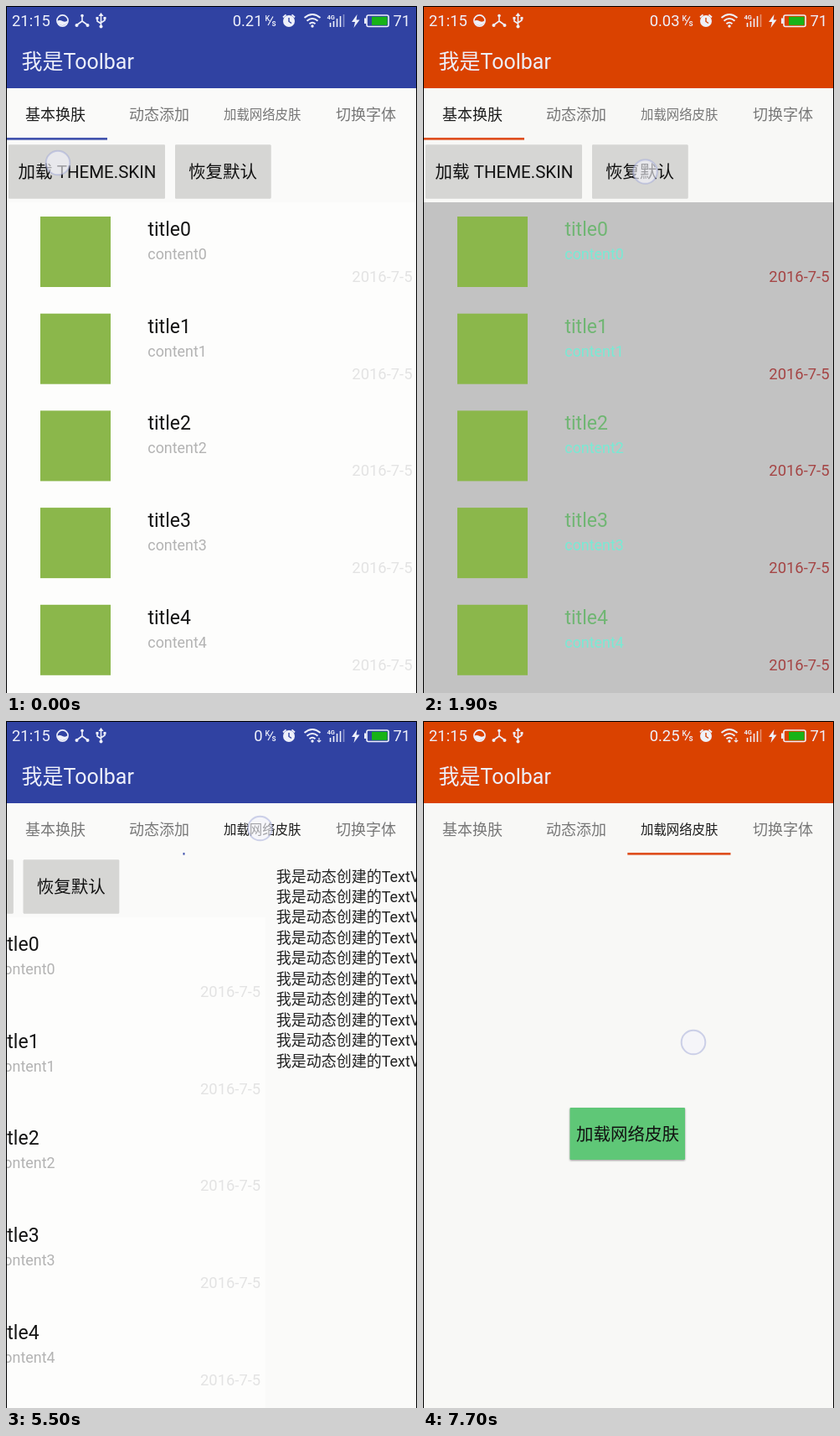
Animation of 491 by 819 pixels, one loop 8000 ms. Source, as an HTML page:

```html
<!DOCTYPE html>
<html lang="zh">
<head>
<meta charset="utf-8">
<title>Skin switch</title>
<style>
  html, body { margin: 0; width: 100%; height: 100%; overflow: hidden; background: #000; }
  svg { display: block; width: 100vw; height: 100vh; }
  text { font-family: Roboto, "Noto Sans CJK SC", "Noto Sans CJK", sans-serif; white-space: pre; }
  #app {
    --bar: #3042a2; --line: #4354ae; --page: #fafaf9; --list: #fdfdfc;
    --title: #141414; --content: #b3b3b3; --date: #e3e3e3; --net: #fafaf9;
  }
  #app.warm {
    --bar: #da4200; --line: #df5020; --page: #f8f8f6; --list: #c2c2c2;
    --title: #70b673; --content: #78ead4; --date: #a54545; --net: #5fc777;
  }
  .bar { fill: var(--bar); }
  .line { fill: var(--line); }
  .page { fill: var(--page); }
  .list { fill: var(--list); }
  .status { font-size: 18.4px; fill: #eef0fa; }
  .tab { fill: #777; }
  .tab.on { fill: #1c1c1c; }
  .title { font-size: 23px; fill: var(--title); }
  .content { font-size: 17.9px; fill: var(--content); }
  .date { font-size: 18.4px; fill: var(--date); text-anchor: end; }
  .label { font-size: 20.5px; fill: #111; }
  .made { font-size: 18px; fill: #222; }
  .btn { fill: #d6d6d4; filter: drop-shadow(0 .5px .6px rgba(0,0,0,.14)); }
  .btn.net { fill: var(--net); filter: drop-shadow(0 1px 1.2px rgba(0,0,0,.4)); }
  .btn.up { filter: drop-shadow(0 2px 2px rgba(0,0,0,.4)); }
  .card { fill: #fafafa; filter: drop-shadow(0 4px 8px rgba(0,0,0,.4)); }
  .icons { fill: none; stroke: #eef0fa; stroke-width: 1.6; }
  .icons .solid { fill: #eef0fa; stroke: none; }
</style>
</head>
<body>
<svg id="app" viewBox="0 0 491 819" preserveAspectRatio="none">
  <defs>
    <clipPath id="btnClip"><rect x="3" y="165" width="187" height="65"/></clipPath>
  </defs>
  <rect class="page" width="491" height="819"/>

  <g id="pager">
    <g id="basic">
      <rect class="list" y="234" width="491" height="585"/>
      <rect id="load" class="btn" x="3" y="165.5" width="187" height="64" rx="1"/>
      <circle id="ripple" clip-path="url(#btnClip)" fill="#000"/>
      <rect class="btn" x="202" y="165.5" width="114.5" height="64" rx="1"/>
      <text class="label" x="14.6" y="205">加载 THEME.SKIN</text>
      <text class="label" x="218" y="205">恢复默认</text>
    </g>
    <g id="dynamic" transform="translate(491)"></g>
    <g transform="translate(982)">
      <rect class="btn net" x="175.5" y="461" width="137.5" height="62" rx="1"/>
      <text class="label" x="183" y="499.5">加载网络皮肤</text>
    </g>
  </g>

  <rect class="page" y="97" width="491" height="64"/>
  <g id="tabs"></g>
  <rect id="marker" class="line" y="157" height="2.7"/>

  <rect class="bar" width="491" height="98"/>
  <text x="18.5" y="75" font-size="25" fill="#eef0fa">我是Toolbar</text>

  <text class="status" x="7" y="24">21:15</text>
  <text id="speed" class="status" x="306.5" y="24" text-anchor="end"></text>
  <text class="status" x="462.5" y="24">71</text>
  <g class="icons">
    <circle cx="67.5" cy="17.5" r="6.6"/>
    <path class="solid" d="M61 18q3-2 6.5 0t6.5-1a6.6 6.6 0 0 1-13 1z"/>
    <path d="M91 10V18L84 23M91 18L98 23"/>
    <circle class="solid" cx="91" cy="11.5" r="1.8"/>
    <circle class="solid" cx="84.5" cy="23" r="2"/>
    <circle class="solid" cx="97.5" cy="23" r="2"/>
    <path d="M113.5 11V25M109 14V18L113.5 21M118 14V17L113.5 20"/>
    <path class="solid" d="M113.5 8l3 4h-6zM107.5 13h3v3h-3zM116.5 13h3v3h-3z"/>
    <circle class="solid" cx="113.5" cy="24.5" r="2"/>

    <text class="solid" x="309.5" y="17.5" font-size="9" font-weight="500">K</text>
    <text class="solid" x="317.5" y="24" font-size="10" font-weight="500">s</text>
    <path d="M313 23L319 12.5" stroke-width="1.2"/>

    <circle cx="338" cy="18" r="6" fill="#eef0fa" stroke-width="2"/>
    <path d="M331 13.5l3.5-3.2M345 13.5l-3.5-3.2" stroke-width="1.8"/>
    <path d="M338 14V18.500L341 20.5" style="stroke:var(--bar)" stroke-width="1.4"/>
    <path d="M356.5 14q9.500-8 19 0M359.500 17.700q6.500-5.500 13 0M362.500 21.200q3.500-3 7 0" stroke-width="2"/>
    <circle class="solid" cx="366" cy="24" r="1.7"/>
    <path id="traffic" d="M374 20V25M371.800 23l2.200 2 2.200-2" stroke-width="1.100"/>
    <text class="solid" x="383.5" y="16" font-size="7.5" font-weight="700">4G</text>
    <path d="M387.5 25V20M391.5 25V18M395.500 25V15M399.500 25V12"/>
    <path d="M403.5 25V10" opacity=".45"/>
    <path class="solid" d="M419.5 10l-6.500 9h4l-1.500 7 7-9.500h-4z"/>
    <rect x="431" y="11" width="26" height="13.5" rx="2"/>
    <path class="solid" d="M428 14.5h2.500v6.500H428z"/>
    <rect x="437" y="12.8" width="18.5" height="10" style="fill:#17b317;stroke:none"/>
  </g>

  <rect id="dim" width="491" height="819"/>
  <g id="dialog">
    <rect class="card" x="31" y="314" width="427.5" height="230" rx="3"/>
    <text x="61.5" y="372" font-size="25.5" fill="#222">换肤中</text>
    <text x="61.5" y="432" font-size="20.5" fill="#6a6a6a">请耐心等待</text>
    <rect x="62" y="472" width="365" height="3.5" fill="#f4bccb"/>
    <text x="61.5" y="506.5" font-size="20.4" fill="#666">0%</text>
    <text x="427.5" y="506.5" font-size="20.4" fill="#666" text-anchor="end">0/100</text>
  </g>

  <circle id="touch" r="14.3" fill="rgba(244,244,250,.62)" stroke="rgba(160,168,215,.5)" stroke-width="2"/>
  <path d="M.5 819V.5H490.5V819" fill="none" stroke="#000"/>
</svg>

<script>
const LOOP = 8000, STEP = 100;
const $ = id => document.getElementById(id);

function add(parent, tag, attrs, text) {
  const el = document.createElementNS('http://www.w3.org/2000/svg', tag);
  for (const key in attrs) el.setAttribute(key, attrs[key]);
  if (text) el.textContent = text;
  parent.appendChild(el);
  return el;
}
const set = (id, attrs) => {
  for (const key in attrs) $(id).setAttribute(key, attrs[key]);
};

for (let i = 0; i < 5; i++) {
  const row = add($('basic'), 'g', { transform: `translate(0 ${i * 115.7})` });
  add(row, 'rect', { x: 41, y: 251, width: 84, height: 84, fill: '#8bb74b' });
  add(row, 'text', { class: 'title', x: 169.5, y: 274 }, 'title' + i);
  add(row, 'text', { class: 'content', x: 169.3, y: 302 }, 'content' + i);
  add(row, 'text', { class: 'date', x: 485.5, y: 329 }, '2016-7-5');
}
for (let i = 0; i < 10; i++)
  add($('dynamic'), 'text', { class: 'made', x: 13, y: 191.5 + i * 24.45 }, '我是动态创建的TextView');

const tabs = [['基本换肤', 23, 18], ['动态添加', 147, 18], ['加载网络皮肤', 260, 15.4], ['切换字体', 394, 18]]
  .map(([name, x, size]) => add($('tabs'), 'text', { x, y: size > 16 ? 135.5 : 134.5, 'font-size': size }, name));

const clamp = v => Math.min(1, Math.max(0, v));
const mix = (a, b, p) => a + (b - a) * p;
const decelerate = p => 1 - (1 - p) ** 5;

// cubic-bezier(.4, 0, .2, 1)
function standard(x) {
  let lo = 0, hi = 1, s = .5;
  for (let i = 0; i < 24; i++) {
    s = (lo + hi) / 2;
    const bx = 1.2 * s * (1 - s) ** 2 + .6 * s * s * (1 - s) + s ** 3;
    if (bx < x) lo = s; else hi = s;
  }
  return x <= 0 ? 0 : x >= 1 ? 1 : s * s * (3 - 2 * s);
}

// from, to, x, y, opacity
const touches = [
  [0, 1400, 62, 187, 1],
  [1900, 3800, 265.5, 197.5, 1],
  [3800, 3900, 265.5, 197.5, .5],
  [4500, 5600, 303.5, 128, 1],
  [6800, 6900, 239, 517, 1],
  [7700, 8000, 323, 383, 1]
];
// time: [dialog opacity, dim opacity]
const dialogs = {
  1400: [.3, .03], 1500: [.77, .08], 1600: [1, .3], 1700: [.6, .25], 1800: [0, .1],
  6900: [.77, .08], 7000: [1, .3], 7100: [.4, .2]
};
// time: [x, radius, opacity]
const ripples = { 1400: [66, 22, .06], 1500: [80, 50, .07], 1600: [92, 85, .05], 1700: [96, 105, .02] };
const speeds = [[7000, '0.25'], [4100, '0'], [1900, '0.03'], [0, '0.21']];
const SLIDE = 5476;

function draw(now) {
  const t = Math.floor(now % LOOP / STEP) * STEP;
  $('app').classList.toggle('warm', t >= 1500 && t < 3700 || t >= 7000);
  $('speed').textContent = speeds.find(s => t >= s[0])[1];
  set('traffic', { opacity: t >= 4100 ? 1 : 0 });

  const slid = t >= SLIDE;
  const scroll = 982 * decelerate(clamp((t - SLIDE) / 600));
  const grow = standard(clamp((t - SLIDE) / 300));
  const left = slid ? mix(211, 244.3, grow) : 1;
  const right = slid ? mix(211, 367.5, grow) : 121;
  set('pager', { transform: `translate(${-scroll})` });
  set('marker', { x: left, width: right - left });
  tabs.forEach((tab, i) => tab.setAttribute('class', i === (slid ? 2 : 0) ? 'tab on' : 'tab'));

  const [alpha, dim] = dialogs[t] || [0, 0];
  set('dialog', { opacity: alpha });
  set('dim', { opacity: dim });

  const [rx, r, ra] = ripples[t] || [0, 0, 0];
  set('ripple', { cx: rx, cy: 197, r, opacity: ra });
  $('load').classList.toggle('up', ra > 0);

  const [, , x, y, opacity] = touches.find(p => t >= p[0] && t < p[1]) || [0, 0, 0, 0, 0];
  set('touch', { cx: x, cy: y, opacity });
}

const start = performance.now();
function tick() {
  draw(performance.now() - start);
  requestAnimationFrame(tick);
}
tick();
</script>
</body>
</html>
```
